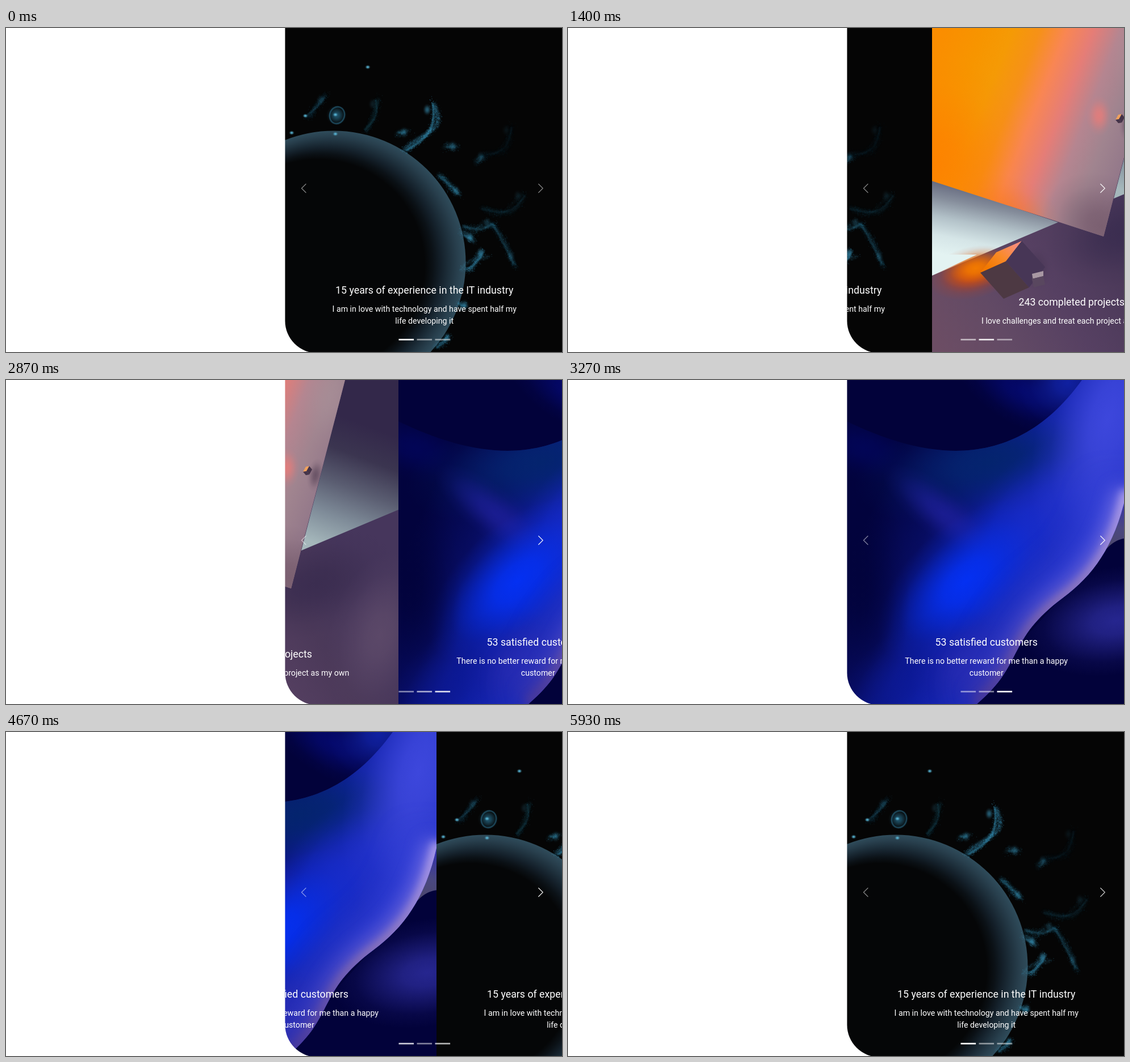
Animation of 979x572 px, one loop 5.99 s. Source, as an HTML page with a canvas:

```html
<!DOCTYPE html>
<html lang="en">
<head>
<meta charset="utf-8">
<title>Carousel</title>
<style>
html, body { margin: 0; width: 100%; height: 100%; overflow: hidden; background: #fff; }
canvas { display: block; }
</style>
</head>
<body>
<canvas id="stage" width="979" height="572"></canvas>
<script>
const W = 979, H = 572, LEFT = 491, SLIDE_W = 491, CENTER = 736.7;
const LOOP = 5990, TICK = 1000 / 15;
const SLIDE_STARTS = [1105, 2612, 4459], SLIDE_TIME = 600;
const ctx = document.getElementById('stage').getContext('2d');

function bezier(x1, y1, x2, y2) {
  const at = (a, b, s) => 3 * a * s * (1 - s) ** 2 + 3 * b * s * s * (1 - s) + s ** 3;
  return x => {
    if (x <= 0) return 0;
    if (x >= 1) return 1;
    let lo = 0, hi = 1;
    for (let i = 0; i < 24; i++) {
      const mid = (lo + hi) / 2;
      if (at(x1, x2, mid) < x) lo = mid; else hi = mid;
    }
    return at(y1, y2, lo);
  };
}
const slideEase = bezier(0.3, 0.08, 0.4, 1);
const fadeEase = bezier(0.25, 0.1, 0.25, 1);

function random(seed) {
  return () => (seed = (seed * 16807) % 2147483647) / 2147483647;
}

// Painting helpers; gradient colors are spaced evenly
function spread(fill, colors) {
  colors.forEach((color, i) => fill.addColorStop(i / (colors.length - 1), color));
  return fill;
}
const linear = (g, x0, y0, x1, y1, ...colors) => spread(g.createLinearGradient(x0, y0, x1, y1), colors);

function poly(g, fill, ...pts) {
  g.beginPath();
  pts.forEach(([x, y]) => g.lineTo(x, y));
  g.closePath();
  g.fillStyle = fill;
  g.fill();
}
function glow(g, x, y, rx, ry, angle, color, alpha = 1) {
  g.save();
  g.globalAlpha = alpha;
  g.translate(x, y);
  g.rotate(angle * Math.PI / 180);
  g.scale(rx, ry);
  g.fillStyle = spread(g.createRadialGradient(0, 0, 0, 0, 0, 1), [color, color + 'd8', color + '80', color + '28', color + '00']);
  g.beginPath();
  g.arc(0, 0, 1, 0, 7);
  g.fill();
  g.restore();
}
// Three visible faces sharing the corner p, spanned by the edges u, v and w
function cube(g, p, u, v, w, ...fills) {
  const add = (...vs) => vs.reduce((a, b) => [a[0] + b[0], a[1] + b[1]], p);
  [[u, v], [v, w], [u, w]].forEach(([a, b], i) => poly(g, fills[i], p, add(a), add(a, b), add(b)));
}

function paintPlanet(g) {
  const cx = 577, cy = 414, radius = 232.5;
  g.fillStyle = '#050505';
  g.fillRect(LEFT, 0, SLIDE_W, H);
  g.fillStyle = spread(g.createRadialGradient(549, 420, 188, cx, cy, radius),
    ['#050607', '#0b1116', '#14202a', '#1e303c', '#283f4d', '#2f4c5b']);
  g.beginPath();
  g.arc(cx, cy, radius, 0, 7);
  g.fill();

  const rnd = random(77);
  const polar = (deg, r) => [cx + r * Math.cos(deg * Math.PI / 180), cy + r * Math.sin(deg * Math.PI / 180)];

  // Smoke from one radius to another, turning by lean degrees on its way
  function flare(angle, from, to, lean, strength) {
    const length = Math.hypot(to - from, lean * 4.5);
    const bend = (to - from) / 25;
    for (let strand = 0; strand < 4; strand++) {
      const phase = rnd() * 6, sway = strand * (0.5 + rnd() * 0.5);
      const at = k => polar(angle + lean * k + bend * Math.sin(Math.PI * k) + sway * Math.sin(phase + k * 5) * 0.7,
        from + (to - from) * k + sway * 3 * Math.cos(phase + k * 4));
      g.strokeStyle = g.fillStyle = '#3fa6d0';
      g.globalAlpha = strength * (strand ? 0.25 : 0.55);
      g.lineWidth = strand ? 4 : 3;
      g.filter = `blur(${strand ? 2 : 1.2}px)`;
      g.beginPath();
      for (let k = 0; k <= 1; k += 0.05) g.lineTo(...at(k));
      g.stroke();
      g.filter = 'none';
      for (let n = 0; n < length * 1.5; n++) {
        const [x, y] = at(rnd());
        g.globalAlpha = strength * rnd() * 0.5;
        g.fillRect(x + (rnd() + rnd() - 1) * 8, y + (rnd() + rnd() - 1) * 8, 1.2, 1.2);
      }
    }
    g.globalAlpha = 1;
    glow(g, ...polar(angle + lean * 0.8, from + (to - from) * 0.8), 8, 11, 0, '#3fa6d0', strength * 0.6);
  }
  flare(-101, 262, 294, 8, 0.3);
  flare(-77, 240, 300, 1, 0.25);
  flare(-64, 256, 262, 3, 0.5);
  flare(-57, 236, 336, -2, 0.9);
  flare(-46, 284, 296, 2, 0.45);
  flare(-40, 240, 252, 12, 0.55);
  flare(-35, 308, 322, -1, 0.35);
  flare(-36, 322, 398, -2, 0.12);
  flare(-20, 276, 362, 0, 0.2);
  flare(-16, 236, 290, 2, 0.4);
  flare(-14, 288, 318, 15, 0.35);
  flare(-12, 234, 246, 2, 0.75);
  flare(3, 232, 266, -8, 0.75);
  flare(18, 230, 246, 0, 0.65);
  flare(40, 236, 240, -8, 0.55);

  g.strokeStyle = '#3285a870';
  g.lineWidth = 2.5;
  g.beginPath();
  g.ellipse(583, 154, 13, 15, 0.3, 0, 7);
  g.stroke();
  glow(g, 582, 154, 18, 18, 0, '#2f86ac', 0.6);
  [[580, 153], [637, 69], [503, 185], [527, 155], [580, 187]].forEach(([x, y]) => glow(g, x, y, 5, 4, 0, '#5bbbdc'));
}

function paintBlocks(g) {
  g.fillStyle = linear(g, 500, 560, 900, 330, '#6c4d64', '#624a65', '#564062', '#4b3959', '#46365c');
  g.fillRect(LEFT, 0, SLIDE_W, H);
  glow(g, 835, 360, 150, 90, -18, '#3b2d50');
  glow(g, 950, 450, 90, 150, 15, '#5b4868');
  poly(g, linear(g, 925, 80, 845, 292, '#33284a', '#3b3550', '#5a5d71', '#7f8c99', '#a5b7bb'),
    [888, 0], [982, 0], [982, 229], [811, 301]);
  poly(g, linear(g, 560, 278, 535, 405, '#60647a', '#858d9b', '#b2c1c8', '#d5e5e7', '#e3f3f2'),
    [491, 268], [713, 343], [491, 437]);

  g.save();
  poly(g, linear(g, 491, 0, 903, 165, '#fb8c00', '#f99000', '#f79500', '#f59a05', '#f69118',
    '#f98653', '#e57d77', '#b58590', '#a0848f', '#94798a', '#7e6576'),
    [491, 0], [888, 0], [793, 368], [491, 270]);
  g.clip();
  glow(g, 500, 240, 160, 190, 0, '#ff7d00', 0.75);
  glow(g, 620, 330, 100, 70, 17, '#fb7500', 0.5);
  glow(g, 785, 155, 23, 36, 0, '#f07b76', 0.75);
  glow(g, 790, 350, 110, 90, 30, '#7b6071');
  glow(g, 862, 30, 60, 90, 15, '#a99199', 0.6);
  glow(g, 836, 168, 15, 30, 10, '#574357', 0.7);
  g.restore();
  cube(g, [820, 161], [5, -9], [-6, 1], [5, 6], '#f0a15b', '#443348', '#443348');

  g.save();
  g.beginPath();
  g.rect(LEFT, 0, 170, H);
  g.clip();
  glow(g, 562, 432, 80, 46, -14, '#c63c12');
  glow(g, 568, 424, 62, 34, -14, '#f27a00');
  g.restore();
  poly(g, '#e3f3f2', [491, 400], [570, 400], [491, 437]);
  glow(g, 675, 424, 28, 40, 0, '#43334f', 0.6);
  cube(g, [621, 412], [28, -36], [-45, 20], [41, 46],
    linear(g, 635, 380, 590, 425, '#f78d77', '#f98a28', '#f27900'), '#4d3943', '#473656');
  cube(g, [667, 443], [20, -5], [0, -9], [3, 15], '#a898a3', '#59475f', '#59475f');
}

function paintWaves(g) {
  g.fillStyle = '#02023a';
  g.fillRect(LEFT, 0, SLIDE_W, H);
  glow(g, 800, 20, 130, 60, 30, '#04086a');
  glow(g, 880, 5, 90, 80, 0, '#1020a0');

  // Far side of the fold and the dark wave beneath it
  g.fillStyle = linear(g, 975, 215, 950, 300, '#3532a8', '#4a4880', '#4c4668');
  g.fillRect(900, 200, 90, 140);
  g.save();
  g.beginPath();
  g.moveTo(984, 279);
  g.bezierCurveTo(945, 283, 940, 320, 890, 360);
  g.lineTo(700, H);
  g.lineTo(984, H);
  g.clip();
  g.fillStyle = '#02023a';
  g.fillRect(700, 270, 290, 310);
  glow(g, 965, 425, 170, 95, -10, '#26268f');
  g.restore();

  function rim() {
    g.moveTo(984, 195);
    g.bezierCurveTo(965, 290, 925, 345, 872, 384);
    g.bezierCurveTo(770, 460, 805, 500, 720, 572);
  }
  g.save();
  g.beginPath();
  rim();
  g.lineTo(LEFT, H);
  g.lineTo(LEFT, 73);
  g.bezierCurveTo(640, 145, 790, 160, 905, 0);
  g.lineTo(984, 0);
  g.closePath();
  g.clip();
  g.fillStyle = linear(g, 520, 260, 900, 430, '#02033e', '#070c60', '#1020a8', '#1c2cbc', '#2a36cc');
  g.fillRect(LEFT, 0, SLIDE_W, H);
  glow(g, 520, 120, 110, 60, 15, '#020556');
  glow(g, 740, 145, 240, 100, -12, '#04246e');
  glow(g, 660, 235, 130, 45, 38, '#2121a0', 0.7);
  glow(g, 840, 240, 170, 110, -45, '#1a2cc8', 0.8);
  glow(g, 950, 70, 120, 270, 15, '#3d47dc');
  glow(g, 700, 355, 190, 100, -42, '#0430f2');
  glow(g, 510, 350, 90, 220, -5, '#02033c');
  glow(g, 610, 520, 170, 85, -35, '#0b1896', 0.7);
  glow(g, 700, 500, 110, 80, -45, '#2a2cb4', 0.7);
  // The lit edge narrows and brightens outwards, and dims towards the bottom
  [90, 45, 20].forEach((width, i) => {
    g.strokeStyle = linear(g, 980, 200, 740, 560, ...[['#4650e6', '#3c48e0', '#3434b4'],
      ['#8f84e8', '#7868c8', '#48389c'], ['#cdb8f0', '#9c7cb0', '#503c96']][i]);
    g.lineWidth = width;
    g.globalAlpha = 0.65;
    g.filter = `blur(${width / 3}px)`;
    g.beginPath();
    rim();
    g.stroke();
  });
  g.restore();
}

function layer(paint) {
  const canvas = document.createElement('canvas');
  canvas.width = SLIDE_W;
  canvas.height = H;
  const g = canvas.getContext('2d');
  g.translate(-LEFT, 0);
  paint(g);
  return canvas;
}
const slides = [
  { art: layer(paintPlanet), title: '15 years of experience in the IT industry',
    lines: ['I am in love with technology and have spent half my', 'life developing it'] },
  { art: layer(paintBlocks), title: '243 completed projects',
    lines: ['I love challenges and treat each project as my own'] },
  { art: layer(paintWaves), title: '53 satisfied customers',
    lines: ['There is no better reward for me than a happy', 'customer'] }
];

function drawSlide({ art, title, lines }, dx) {
  ctx.drawImage(art, LEFT + dx, 0);
  ctx.fillStyle = '#fff';
  ctx.textAlign = 'center';
  const first = 522 - (lines.length - 1) * 21;
  ctx.font = '17.76px Roboto, sans-serif';
  ctx.fillText(title, CENTER + dx, first - 32);
  ctx.font = '14.21px Roboto, sans-serif';
  lines.forEach((line, i) => ctx.fillText(line, CENTER + dx, first + i * 21));
}

function drawChevron(x, dir, alpha) {
  ctx.strokeStyle = `rgba(255,255,255,${alpha})`;
  ctx.lineWidth = 1.25;
  ctx.lineCap = ctx.lineJoin = 'round';
  ctx.beginPath();
  ctx.moveTo(x - 3.75 * dir, 275.5);
  ctx.lineTo(x + 3.75 * dir, 283);
  ctx.lineTo(x - 3.75 * dir, 290.5);
  ctx.stroke();
}

const progress = (t, ease) =>
  SLIDE_STARTS.reduce((sum, start) => sum + ease((t - start) / SLIDE_TIME), 0);

function draw(t) {
  ctx.fillStyle = '#fff';
  ctx.fillRect(0, 0, W, H);
  ctx.save();
  ctx.beginPath();
  ctx.roundRect(LEFT + 0.4, -10, SLIDE_W, 584, [0, 0, 0, 57]);
  ctx.clip();

  const pos = progress(t, slideEase), index = Math.floor(pos);
  const shift = Math.round((pos - index) * SLIDE_W);
  drawSlide(slides[index % 3], -shift);
  if (shift) drawSlide(slides[(index + 1) % 3], SLIDE_W - shift);

  const mark = progress(t, fadeEase);
  for (let i = 0; i < 3; i++) {
    const away = Math.min(Math.abs(mark - i), Math.abs(mark - i - 3));
    ctx.fillStyle = `rgba(255,255,255,${0.5 + 0.5 * Math.max(0, 1 - away)})`;
    ctx.fillRect(691.5 + i * 32, 548.8, 26.6, 2.66);
  }

  const hover = fadeEase((t - 320) / 150) - fadeEase((t - 5900) / 150);
  drawChevron(524.2, -1, 0.5);
  drawChevron(941.5, 1, 0.5 + 0.4 * hover);
  ctx.restore();
}

// The motion advances at fifteen pictures a second.
function frame() {
  const t = performance.now() % LOOP;
  draw(Math.floor((t + 4) / TICK) * TICK);
  requestAnimationFrame(frame);
}
frame();
</script>
</body>
</html>
```
